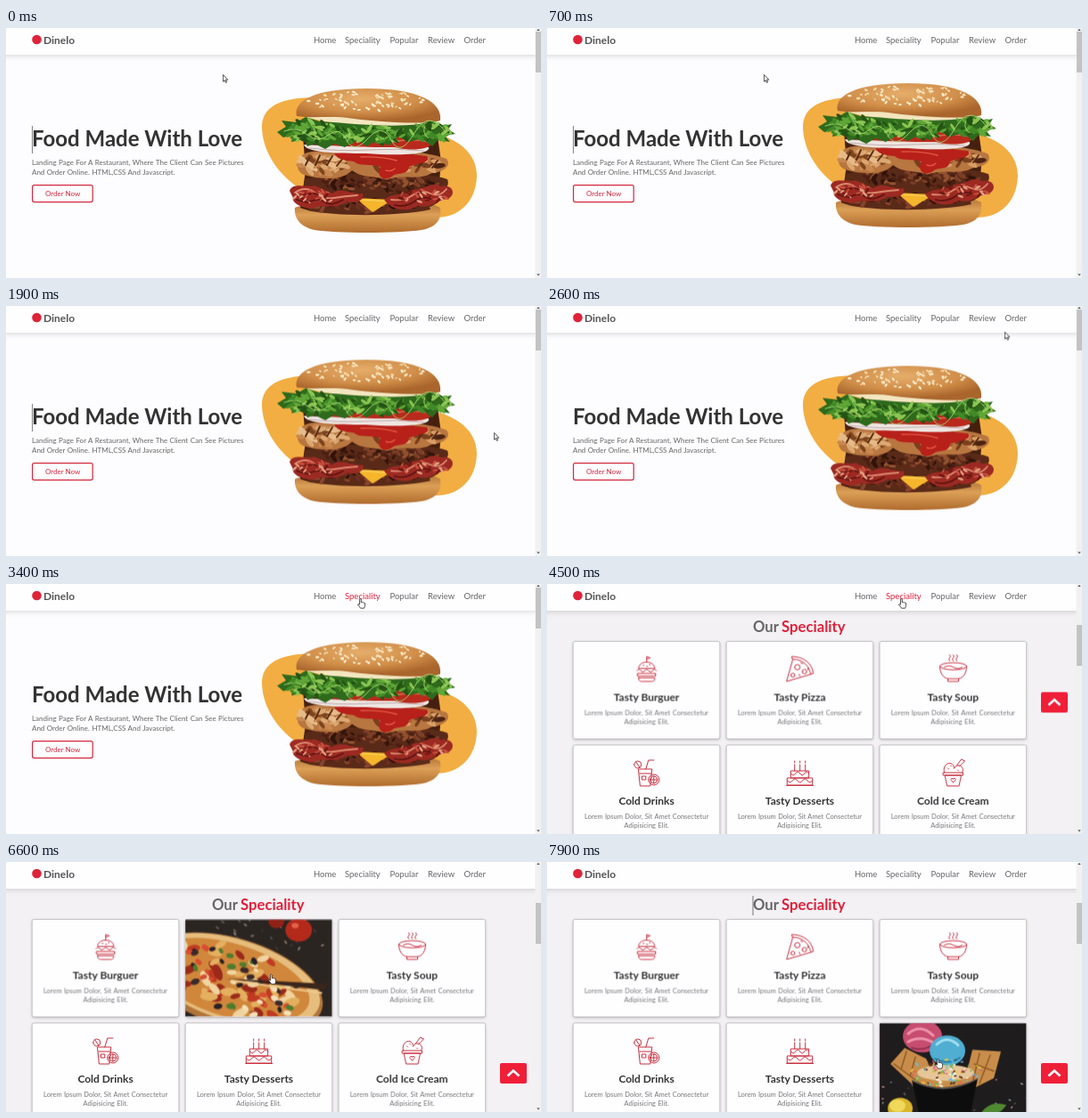
An HTML page that plays this animation: 600 by 281 pixels, repeating every 8 s.

```html
<!DOCTYPE html>
<html lang="en">
<head>
<meta charset="utf-8">
<title>Restaurant landing page</title>
<style>
html, body { margin: 0; width: 100%; height: 100%; overflow: hidden; background: #fdfcfe; }
#stage { display: block; width: 600px; height: 281px; font-family: Lato, "Open Sans", sans-serif; }
.nav { font-size: 9.5px; fill: #666; }
.brand { font-size: 12px; font-weight: 700; fill: #555; }
.hero { font-size: 24px; font-weight: 700; fill: #333; }
.lead { font-size: 8px; word-spacing: .4px; fill: #666; }
.order { font-size: 8px; fill: #d3293d; }
.heading { font-size: 16.7px; font-weight: 700; fill: #666; }
.red { fill: #e0213a; }
.name { font-size: 12px; font-weight: 700; fill: #333; text-anchor: middle; }
.note { font-size: 7.5px; word-spacing: .5px; fill: #777; text-anchor: middle; }
.icon { fill: none; stroke: #c8303f; stroke-width: 1; stroke-linejoin: round; stroke-linecap: round; }
.frame { fill: #fefdff; stroke: #b5b3b6; stroke-width: .7; filter: drop-shadow(0 1px 1.5px rgba(0,0,0,.22)); }
.bar { fill: #fefdff; filter: drop-shadow(0 1px 3px rgba(0,0,0,.16)); }

.page, .thumb, .float, .caret, .hot, .up, .mouse, .arrow, .hand, .c0, .c1, .c2, .c5 {
  animation: 8s linear infinite;
}
.page { animation-name: scroll; }
.thumb { animation-name: thumb; }
.float { animation-name: float; }
.hot { animation-name: hot; animation-timing-function: step-end; }
.up { animation-name: up; }
.mouse { animation-name: mouse; animation-timing-function: ease-in-out; }
.arrow { animation-name: arrow; animation-timing-function: step-end; }
.hand { animation-name: hand; animation-timing-function: step-end; }
.caret { animation-timing-function: step-end; stroke: #555; stroke-width: .8; }
.caret.a { animation-name: blinkA; }
.caret.b { animation-name: blinkB; }
.c0 { animation-name: open0; }
.c1 { animation-name: open1; }
.c2 { animation-name: open2; }
.c5 { animation-name: open5; }

@keyframes scroll {
  0%, 45.6% { transform: none; animation-timing-function: ease-in-out; }
  54.4%, 100% { transform: translateY(-256px); }
}
@keyframes thumb {
  0%, 45.6% { transform: none; animation-timing-function: ease-in-out; }
  54.4%, 100% { transform: translateY(42px); }
}
@keyframes float {
  0% { transform: none; animation-timing-function: cubic-bezier(.12,0,.39,0); }
  7.875% { transform: translateY(-5.1px); animation-timing-function: cubic-bezier(.61,1,.88,1); }
  17.25% { transform: translateY(-10.4px); animation-timing-function: cubic-bezier(.37,0,.63,1); }
  36% { transform: translateY(.2px); animation-timing-function: cubic-bezier(.37,0,.63,1); }
  54.75%, 100% { transform: translateY(-10.4px); }
}
@keyframes blinkA {
  0%, 7.5%, 20.75%, 34% { opacity: 1; }
  1%, 14.25%, 27.5%, 40.75%, 100% { opacity: 0; }
}
@keyframes blinkB {
  0%, 64.6%, 77.9%, 91.1% { opacity: 0; }
  58%, 71.25%, 84.5%, 97.75%, 100% { opacity: 1; }
}
@keyframes hot {
  0%, 57.9%, 100% { fill: #666; }
  38.75% { fill: #e0213a; }
}
@keyframes up {
  0%, 48.75% { transform: translateY(-426px); }
  56.25% { transform: translateY(-105px); animation-timing-function: cubic-bezier(.2,.65,.5,1); }
  66.5% { transform: translateY(25px); animation-timing-function: ease-in-out; }
  75%, 100% { transform: none; }
}
@keyframes mouse {
  0%, 12.5% { transform: translate(243px,52px); }
  21.9%, 24.4% { transform: translate(547px,142px); }
  29.4% { transform: translate(578px,62px); }
  33.75% { transform: translate(500px,22px); }
  39.4%, 57.5% { transform: translate(396px,16px); }
  61.9% { transform: translate(190px,62px); }
  66.25% { transform: translate(112px,120px); }
  75% { transform: translate(125px,125px); }
  78.75%, 84.4% { transform: translate(296px,126px); }
  87.5% { transform: translate(425px,130px); }
  91.25%, 100% { transform: translate(437px,221px); }
}
@keyframes arrow { 0%, 58.1% { opacity: 1; } 38.75%, 61.9%, 100% { opacity: 0; } }
@keyframes hand { 0%, 58.1% { opacity: 0; } 38.75%, 61.9%, 100% { opacity: 1; } }
@keyframes open0 {
  0%, 63.75%, 78.1%, 100% { transform: none; }
  66.25%, 75.6% { transform: translateY(109.5px); }
}
@keyframes open1 {
  0%, 76.25%, 88.1%, 100% { transform: none; }
  78.75%, 85.6% { transform: translateY(109.5px); }
}
@keyframes open2 {
  0%, 86.25%, 92.5%, 100% { transform: none; }
  88.75%, 90% { transform: translateY(109.5px); }
}
@keyframes open5 {
  0%, 91.25% { transform: none; }
  93.75%, 100% { transform: translateY(109.5px); }
}
</style>
</head>
<body>
<svg id="stage" viewBox="0 0 600 281">
  <defs>
    <radialGradient id="bunTop" cx=".45" cy=".3" r=".65">
      <stop offset="0" stop-color="#e6ae6b"/><stop offset=".6" stop-color="#d08e49"/><stop offset="1" stop-color="#a9652c"/>
    </radialGradient>
    <linearGradient id="bunLow" x2="0" y2="1">
      <stop offset="0" stop-color="#a8682f"/><stop offset=".45" stop-color="#dca057"/><stop offset="1" stop-color="#b06c2e"/>
    </linearGradient>
  </defs>

  <rect width="600" height="281" fill="#fdfcfe"/>

  <g class="page">
    <text class="hero" x="29" y="133.300">Food Made With Love</text>
    <path class="caret a" d="M29.400 110v31"/>
    <text class="lead" x="29" y="154">Landing Page For A Restaurant, Where The Client Can See Pictures</text>
    <text class="lead" x="29" y="164.500">And Order Online. HTML,CSS And Javascript.</text>
    <rect x="29.600" y="176.600" width="67.600" height="19" rx="2" fill="none" stroke="#d3293d" stroke-width="1.200"/>
    <text class="order" x="44" y="189">Order Now</text>

    <path fill="#f2ae42" d="M287 112C287 90 304 82 328 79C378 72 410 110 450 113C502 117 528 138 528 166C527 196 508 213 482 213C430 214 370 205 332 182C306 166 288 140 287 112z"/>
    <g class="float"><g id="burger"></g></g>

    <g transform="translate(0 256)">
      <rect y="25" width="600" height="340" fill="#f3f1f4"/>
      <text class="heading" x="231" y="54">Our<tspan class="red" x="263">Speciality</tspan></text>
      <path class="caret b" d="M231 38v22"/>
      <g id="cards"></g>
    </g>
  </g>

  <rect class="bar" x="-6" y="-6" width="606" height="36"/>
  <circle cx="34.500" cy="13" r="5.300" fill="#df2338"/>
  <text class="brand" x="42" y="17.500">Dinelo</text>
  <g class="nav">
    <text x="345" y="17">Home</text>
    <text class="hot" x="380" y="17">Speciality</text>
    <text x="430.500" y="17">Popular</text>
    <text x="473" y="17">Review</text>
    <text x="513.500" y="17">Order</text>
  </g>

  <g class="up">
    <rect x="554" y="226" width="30" height="23" rx="2" fill="#f01f38"/>
    <path d="M562.500 240.500l6.500-6 6.500 6" fill="none" stroke="#fff" stroke-width="2.600"/>
  </g>

  <rect x="593.500" width="6.500" height="281" fill="#f1f1f1"/>
  <rect class="thumb" x="594" y="4" width="6" height="46" fill="#c3c3c3"/>
  <path d="M595.200 3h3.600l-1.800-2zM595.200 276.500h3.600l-1.800 2z" fill="#555"/>

  <g class="mouse" stroke="#222" stroke-width=".8" stroke-linejoin="round" fill="#fff">
    <path class="arrow" d="M.4 .5v7.800l1.800-1.600 1.200 2.700 1.300-.6-1.200-2.600h2.300z"/>
    <path class="hand" d="M.6 .8q1-.9 1.700 .2v3.600q.9-.7 1.500 .2 1-.6 1.500 .3 1.200-.3 1.300 .8v2.400q-.2 1.500-1 2.900h-4q-1.200-2-3.100-4.100 .4-1.200 2.100 0z"/>
  </g>
</svg>

<script>
const W = 164.500, H = 109.500;
let seed = 7;
const rnd = () => (seed = (seed * 16807) % 2147483647) / 2147483647;

// Ellipses thrown evenly over an oval, sized rx by ry.
function scatter(n, cx, cy, w, h, rx, ry, colours) {
  let out = '';
  for (let i = 0; i < n; i++) {
    const a = rnd() * 6.283, d = Math.sqrt(rnd()), s = .7 + rnd() * .6;
    const x = (cx + Math.cos(a) * d * w).toFixed(1), y = (cy + Math.sin(a) * d * h).toFixed(1);
    out += `<ellipse cx="${x}" cy="${y}" rx="${rx * s}" ry="${ry * s}" fill="${colours[i % colours.length]}"
      transform="rotate(${Math.round(rnd() * 120 - 60)} ${x} ${y})"/>`;
  }
  return out;
}
const shape = (fill, d) => `<path fill="${fill}" d="${d}"/>`;
const line = (colour, width, d) => `<path fill="none" stroke="${colour}" stroke-width="${width}" stroke-linecap="round" d="${d}"/>`;
const oval = (fill, x, y, rx, ry = rx) => `<ellipse fill="${fill}" cx="${x}" cy="${y}" rx="${rx}" ry="${ry}"/>`;
const ring = (x, y, r) => `M${x - r} ${y}a${r} ${r} 0 1 0 ${2 * r} 0a${r} ${r} 0 1 0 ${-2 * r} 0`;
const ground = fill => `<rect width="${W}" height="${H}" fill="${fill}"/>`;

const lowBun = shape('url(#bunLow)', 'M324 202C345 192 470 190 487 202C489 216 482 224 466 227C440 231 370 231 346 227C328 223 323 212 324 202z');
const filling = shape('#46200f', 'M332 108H482L488 150L484 196C470 212 350 212 330 202L336 160z');
const patty = shape('#5a2a18', 'M336 170C360 162 470 160 495 170C499 180 488 186 470 188L476 204C440 212 370 212 338 205L344 188C336 184 332 176 336 170z') +
  scatter(70, 414, 176, 72, 9, 4, 1.800, ['#7c3f27', '#32140b', '#92522f', '#4a1f12']) +
  scatter(44, 406, 200, 66, 7, 4, 1.800, ['#6e3020', '#2d110b', '#87452c']);
const cheese = shape('#f5b62c', 'M392 191L434 193L411 207z') + line('#ffd865', 1, 'M396 193l34 2');
const bacon =
  shape('#9c2a22', 'M318 183C322 173 336 180 346 177L366 186C376 178 388 188 400 186C404 194 390 198 382 195C368 206 356 196 344 203C332 203 320 196 322 191z') +
  shape('#9c2a22', 'M424 193C436 184 446 190 456 182C470 182 476 172 488 178C500 175 506 186 496 192C484 192 478 204 462 200C448 208 432 204 424 193z') +
  line('#dd8a70', 1.800, 'M324 185q12-8 22 0t22 6 26-3M432 193q14 2 24-5t20-2 18-5') +
  line('#5c1512', 1.800, 'M326 193q10 4 18 1t14 2 20-3M436 199q12 3 22-4t18-3') +
  scatter(26, 346, 190, 24, 8, 3, 1.100, ['#c8523f', '#6e1814', '#e3a184']) +
  scatter(26, 468, 190, 28, 8, 3, 1.100, ['#c8523f', '#6e1814', '#e3a184']);
const chicken =
  shape('#b87640', 'M329 148C334 134 362 140 380 138C420 134 470 138 494 147C500 154 492 162 478 163C462 172 446 164 428 170C410 166 398 168 388 160C378 172 352 170 338 166C327 164 325 156 329 148z') +
  scatter(36, 358, 152, 28, 11, 6, 2.600, ['#dca872', '#c88850', '#7d451f', '#e6bb88']) +
  scatter(36, 450, 153, 40, 9, 6, 2.400, ['#d99f66', '#7a3f1e', '#c28048', '#4d2412']) +
  line('#5a2c14', 2, 'M340 146l-4 8M352 143l-5 11M366 144l-6 10M378 146l-7 9M470 148l-7 8M484 149l-6 8');
const sauce = shape('#b8201a', 'M368 141C396 137 440 140 472 144C478 151 462 152 452 156C450 166 440 162 434 166C424 174 414 166 420 156C408 152 396 156 390 150C380 149 372 148 368 141z') +
  line('#e45a44', 1.400, 'M398 145q22-1 40 4M426 160q6 2 10-2');
const salad =
  shape('#efe6e2', 'M334 131C370 134 440 130 474 134C478 142 440 144 404 141C370 141 336 140 334 131z') +
  line('#b9a5a6', .9, 'M340 135q34 4 66 2t62 1') +
  shape('#b92a1c', 'M328 122C370 128 420 130 440 122C460 120 478 122 478 128C478 138 448 138 436 134C400 134 340 134 328 122z') +
  line('#e4674b', 1.600, 'M440 127q18-3 34 1');
const lettuce =
  shape('#2f6a1c', 'M304 117L314 111L309 104L326 106L336 100L352 105C396 108 430 112 464 108L478 104L490 110L500 108L496 114L504 119L492 121L498 128L484 126L478 133L466 124L452 128L440 122L430 132L416 127L404 133L394 126L380 134L368 130L358 136L346 130L338 133L334 125L320 128L322 120L311 123z') +
  scatter(48, 344, 116, 31, 12, 5, 1.800, ['#5fa637', '#245315', '#8cc653', '#418a27']) +
  scatter(54, 408, 120, 48, 9, 5, 1.800, ['#5fa637', '#245315', '#8cc653', '#418a27']) +
  scatter(34, 474, 116, 24, 10, 5, 1.800, ['#5fa637', '#245315', '#8cc653', '#418a27']) +
  line('#a9d873', .9, 'M312 116q14-6 26 4t24 0 20 6 24-2 26 2 26-8 36 0M342 108q8 10 4 18M384 114q4 8-2 14M470 110q-4 8 4 14');
const topBun =
  shape('#f3e6c0', 'M334 100C380 100 440 100 483 104C470 113 420 113 378 109z') +
  shape('url(#bunTop)', 'M326 99C322 82 346 68 404 68C464 68 490 84 487 104C470 109 424 106 390 102C366 98 346 102 326 99z') +
  scatter(68, 406, 82, 68, 11, 1.900, 1, ['#fff0d2', '#f5dcae', '#fbe9c6']);

const burger = lowBun + filling + patty + cheese + bacon + chicken + sauce + salad + topBun + lettuce;
document.getElementById('burger').innerHTML = burger;

const photos = {
  0: () => ground('#33251d') + oval('#6b472c', 82, 98, 90, 22) +
    '<use href="#burger" transform="translate(-150 -34) scale(.57)"/>',
  1: () => ground('#2b2522') + scatter(40, 90, 18, 80, 20, 2, .8, ['#6b625a', '#443b35', '#8f8579']) +
    oval('#b32a1b', 127, 12, 15, 13) + oval('#e6614a', 123, 7, 4, 3) + oval('#8f2117', 102, 2, 9, 8) +
    '<g transform="rotate(17 56 70)">' + oval('#b0743a', 54, 72, 104, 50) + oval('#e6bd7c', 53, 69, 101, 46) + oval('#d0873c', 50, 70, 92, 41) +
    scatter(56, 50, 70, 86, 38, 8, 4, ['#c03a22', '#f0d4a0', '#e4b060', '#9c2a1a']) +
    scatter(50, 50, 70, 82, 36, 4, 2.600, ['#2a2025', '#4f7d2c', '#3a2a2b', '#d84c30', '#f4e0b8']) +
    shape('#3a261b', 'M44 70L156 42L154 50z') + line('#efcb8e', 2, 'M52 70L152 54') + '</g>',
  2: () => ground('#3a322c') + oval('#191514', 82, 66, 66, 42) + oval('#e9e2d6', 82, 58, 62, 38) + oval('#d98a33', 82, 56, 52, 30) +
    scatter(30, 82, 56, 42, 22, 5, 2.500, ['#efb661', '#c5652a', '#5f8a35', '#f4dba8']),
  5: () => ground('#1f1c1d') + scatter(36, 84, 80, 85, 35, 1.500, .7, ['#6a5b48', '#d98b9a', '#8fa8b0']) +
    shape('#c88d4a', 'M12 46L28 28L52 40L62 60L98 54L104 30L136 32L128 62L100 76L44 76z') +
    line('#8c5926', 1.400, 'M16 46l32 24M30 32l-6 20M40 38l-6 22M112 34l-8 34M124 36l-12 32M106 46l22 8') +
    oval('#c64d70', 48, 15, 22, 18) + line('#ee93ab', 3, 'M32 12q14-12 28 2M32 21q14-8 30 2') + line('#94304f', 2, 'M36 28q14 4 26-5') +
    oval('#4faed2', 76, 31, 20, 17) + line('#a3def0', 3, 'M64 24q12-11 24 1') + line('#2b83ab', 2, 'M62 40q14 8 28-1') +
    oval('#e6c698', 74, 56, 32, 9) +
    scatter(85, 74, 56, 42, 15, 2, .9, ['#f4efe2', '#e85c6d', '#f1c53b', '#66b65c', '#69bce0', '#5a2f1c']) +
    shape('#0e0d0e', 'M36 64Q72 82 110 62L100 110H46z') + line('#6a6461', 1.300, 'M37 65Q72 83 109 63') +
    oval('#d9b62c', 23, 96, 14, 12) + oval('#f0d95a', 20, 93, 9, 7) + shape('#4f8a32', 'M112 104Q122 86 142 92Q134 106 112 104z')
};

const items = [
  ['Tasty Burguer', 'M0-8v-6l4 1.500-4 1.500M-9-1c0-9 18-9 18 0zM-11 2q2.200-3 4.400 0t4.400 0 4.400 0 4.400 0 4.400 0M-10 5h20v3h-20zM-9 10h18c0 4-2 4-4 4h-10c-2 0-4 0-4-4zM-4-4h1M3-5h1M0-3h1'],
  ['Tasty Pizza', 'M-9-14C4-14 14-6 15 5l-3 1C11-3 3-11-8-11zM-8-11L-15 14 12 6' + ring(-3, -2, 3) + ring(5, 3, 2.500) + ring(-8, 7, 2.200) + 'M1-7l2 1M-1 6l1 2M9-1v2'],
  ['Tasty Soup', 'M-15-3a15 4 0 1 0 30 0a15 4 0 1 0-30 0c0 8 4 13 9 14h12c5-1 9-6 9-14M-6 11v3h12v-3M-10-2q5-3 10 0t10 0M-4-9q-2-2 0-3.500t0-3.500M0-9q-2-2 0-3.500t0-3.500M4-9q-2-2 0-3.500t0-3.500'],
  ['Cold Drinks', 'M-9-4h15l-2 19h-11zM-8 1h13M-1-4l3-10h6M-5 4h4v4h-4z' + ring(8, 8, 6) + ring(8, 8, 4) + 'M8 4v8M4 8h8' + ring(-10, -9, 4) + 'M-12-12l4 6'],
  ['Tasty Desserts', 'M-10-2h20v8h-20zM-14 6h28v8h-28zM-15 14.500h30M-6-2v-7M0-2v-7M6-2v-7M-6-11v-2M0-11v-2M6-11v-2M-10 1q2.500 4 5 0t5 0 5 0 5 0M-14 9q2.800 4 5.600 0t5.600 0 5.600 0 5.600 0 5.600 0'],
  ['Cold Ice Cream', 'M-9 3h18l-2.500 12h-13zM-11 0h22v3h-22zM-10 0c-3-12 11-14 11-5M1-5c4-7 13-1 9 5M4-8l5-7 4 2-6 6M-6-5l1 1M-3-8l1 1M5-3l1 1M0 11q-4-3-2-4.500 2-.5 2 1 0-1.500 2-1 2 1.500-2 4.500']
];

document.getElementById('cards').innerHTML = items.map(([name, icon], i) => {
  const x = 29.300 + (i % 3) * 171.900, y = i < 3 ? 64.500 : 181;
  const photo = photos[i] ? `<svg y="${-H}" width="${W}" height="${H}">${photos[i]()}</svg>` : '';
  return `<rect class="frame" x="${x}" y="${y}" width="${W}" height="${H}" rx="2"/>
    <svg x="${x}" y="${y}" width="${W}" height="${H}"><g class="c${i}">${photo}
      <path class="icon" transform="translate(82.500 31)" d="${icon}"/>
      <text class="name" x="82.300" y="66.500">${name}</text>
      <text class="note" x="82.300" y="82.500">Lorem Ipsum Dolor, Sit Amet Consectetur</text>
      <text class="note" x="82.300" y="92.800">Adipisicing Elit.</text>
    </g></svg>`;
}).join('');
</script>
</body>
</html>
```
